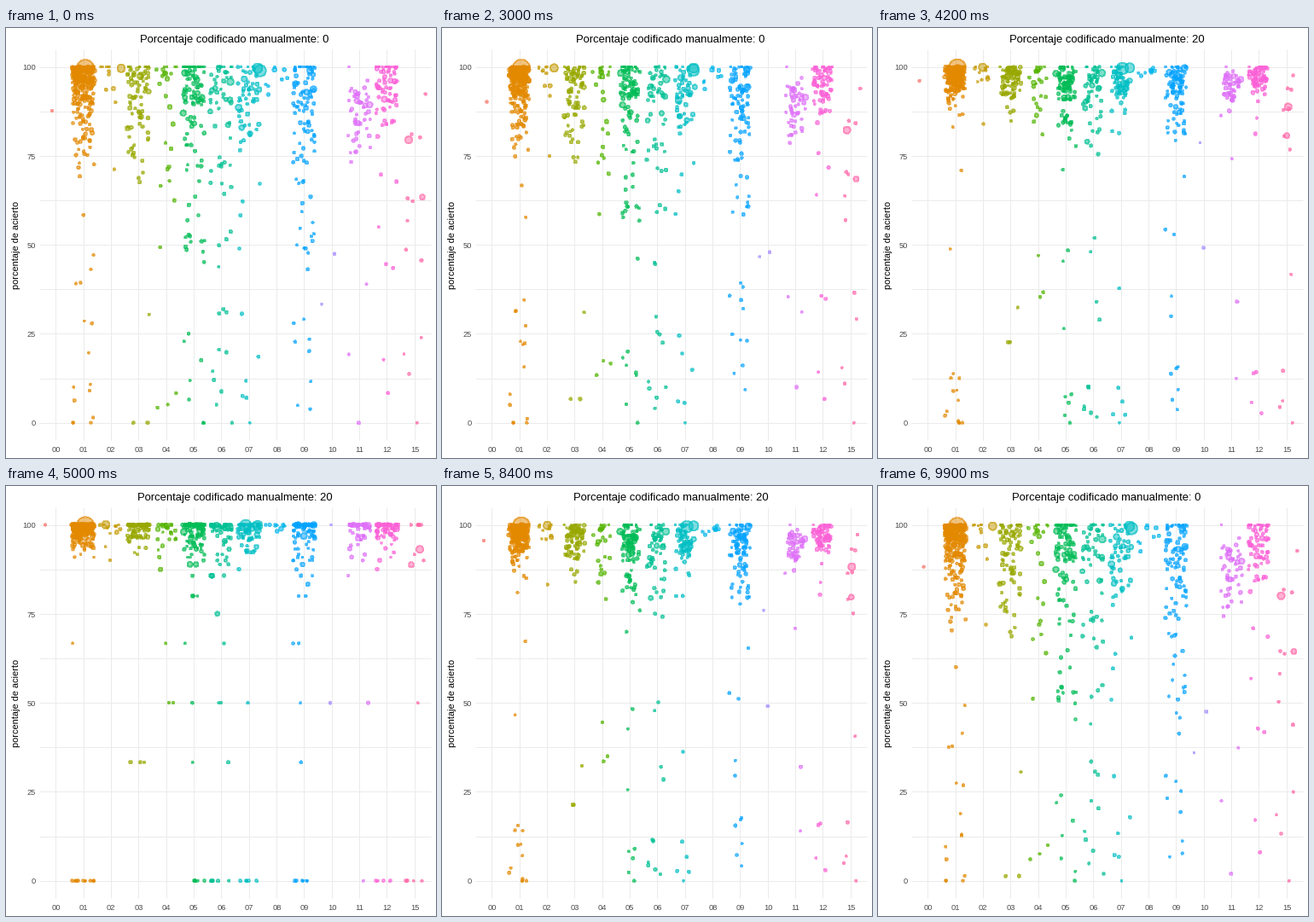
These frames come from a looping animation (504x504 px, 10000 ms). A matplotlib script:

```python
import matplotlib.pyplot as plt
import numpy as np
from matplotlib.animation import FuncAnimation
from matplotlib.colors import to_rgba

SIZE, DPI = 504, 72
STEPS, HOLD, FRAMES = 25, 25, 100
LEFT, RIGHT, TOP, BOTTOM = 39, 498, 24.6, 483.4
LABELS = ["%02d" % i for i in range(13)] + ["15"]
COLORS = ["#F8766D", "#E38900", "#C49A00", "#99A800", "#53B400", "#00BC56",
          "#00C094", "#00BFC4", "#00B6EB", "#06A4FF", "#A58AFF", "#DF70F8",
          "#FB61D7", "#FF66A8"]

# Per column: dots, mean miss in %, shape of the miss, poor dots, dots ending at 0
GROUPS = {1: (285, 6.8, 1, 15, 12), 2: (11, 9, 1, 0, 0),
          3: (88, 10, 1, 3, 0), 4: (26, 15, 1, 3, 0),
          5: (112, 17, 1, 8, 5), 6: (62, 19, 1, 11, 6),
          7: (62, 13, 1, 6, 5), 8: (8, 6, 1, 0, 0),
          9: (104, 17, 1, 11, 6), 11: (50, 13, 4, 3, 1),
          12: (80, 10, 1, 4, 4), 13: (12, 30, 4, 5, 4)}

# The large or solitary dots: column, start x, start %, end x, end %, radius
KEY_DOTS = [(0, 54, 87.7, 46, 100, 1.8), (1, 93, 99.6, 93, 99.8, 10.5),
            (2, 135, 99.6, 117, 100, 5), (6, 263, 95.8, 262, 99.4, 4.4),
            (7, 298, 98.9, 281, 99.8, 7.2), (7, 295, 99.6, 295, 99.8, 6),
            (10, 385, 47.4, 380, 50, 2), (10, 370, 33.3, 381, 100, 1.4),
            (13, 472, 79.5, 485, 93.1, 4.6), (13, 488, 63.4, 475, 88.8, 3.5)]

rng = np.random.default_rng(14)


def col_x(i):
    return 58.15 + 32.36 * i


def pct_y(p):
    return 462.7 - 4.172 * p


def misses(n, mean, shape, exact):
    """Distance below 100 %, with a share of exact hits."""
    d = rng.gamma(shape, mean / shape, n)
    return np.where(rng.random(n) < exact, 0, d)


def to_ratio(miss):
    """Larger misses fall on simple fractions such as 5/6 or 3/4."""
    parts = np.clip(np.round(100 / np.maximum(miss, 1)), 3, 12)
    return np.where(miss > 8, 100 / parts, miss)


def make_group(col, n, mean, shape, poor, zeros):
    first = np.minimum(misses(n, mean, shape, 0.15 / shape), rng.uniform(44, 52, n))
    last = to_ratio(misses(n, mean / 3.5, 1, 0.35))
    radius = np.minimum(1.5 + 0.55 * rng.gamma(1.5, 0.8, n), 4)
    radius = np.where(first > 20, np.minimum(radius, 2.2), radius)
    radius[first == 0] = 1.4
    if poor:
        first[:poor] = np.minimum(rng.uniform(50, 110, poor), 100)
        last[:poor] = rng.choice([0, 33.3, 50, 66.7], poor)
        last[:zeros] = 100
        radius[:poor] = rng.uniform(1.4, 2.2, poor)
    xs = col_x(col) + rng.uniform(-13, 13, (2, n))
    return np.column_stack([np.full(n, col), xs[0], 100 - first,
                            xs[1], 100 - last, radius])


dots = np.vstack([KEY_DOTS] + [make_group(c, *g) for c, g in GROUPS.items()])
start = np.column_stack([dots[:, 1], pct_y(dots[:, 2])])
end = np.column_stack([dots[:, 3], pct_y(dots[:, 4])])
tints = [to_rgba(COLORS[int(c)], 0.5) for c in dots[:, 0]]

plt.rcParams["font.family"] = "Liberation Sans"
fig = plt.figure(figsize=(SIZE / DPI, SIZE / DPI), dpi=DPI, facecolor="white")
ax = fig.add_axes([0, 0, 1, 1])
ax.set(xlim=(0, SIZE), ylim=(SIZE, 0))
ax.axis("off")

grid = dict(color="#EBEBEB", lw=1, zorder=1, solid_capstyle="butt")
tick = dict(fontsize=9.3, color="#4D4D4D", va="baseline")
for k in range(9):
    y = pct_y(12.5 * k)
    ax.plot([LEFT, RIGHT], [y, y], **grid)
    if k % 2 == 0:
        ax.text(34.8, y + 3.7, "%d" % (12.5 * k), ha="right", **tick)
for i, label in enumerate(LABELS):
    ax.plot([col_x(i)] * 2, [TOP, BOTTOM], **grid)
    ax.text(col_x(i) + 0.3, 497, label, ha="center", **tick)
ax.text(12.2, 254.5, "porcentaje de acierto", fontsize=11, rotation=90,
        ha="center", va="center")
title = ax.text(268, 17, "", fontsize=13, ha="center", va="baseline")

points = ax.scatter(*start.T, s=(2 * dots[:, 5] - 1) ** 2, facecolors=tints,
                    edgecolors=tints, linewidths=1, antialiaseds=False, zorder=3)


def progress(frame):
    """Hold, move linearly, hold, move back."""
    half, k = divmod(frame, FRAMES // 2)
    t = max(0, k - HOLD) / STEPS
    return 1 - t if half else t


def draw(frame):
    t = progress(frame)
    points.set_offsets(start + (end - start) * t)
    title.set_text("Porcentaje codificado manualmente: %d" % (20 if t > 0.5 else 0))
    return points, title


anim = FuncAnimation(fig, draw, frames=FRAMES, interval=100, repeat=True)
plt.show()
```
